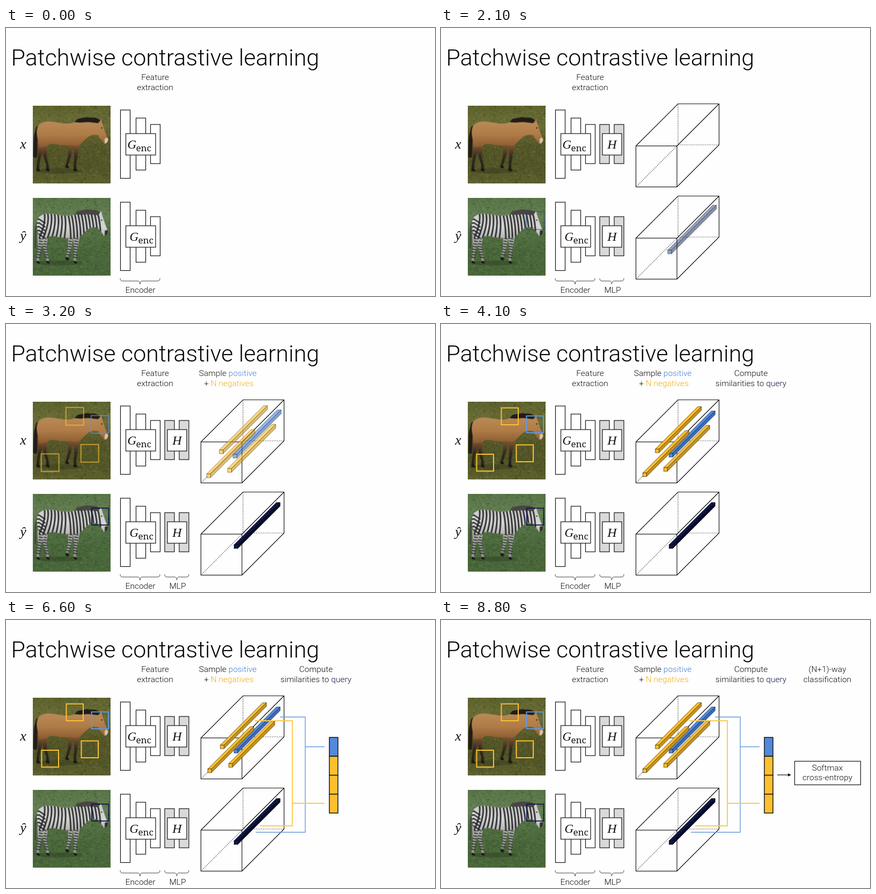
An HTML page with a canvas that plays this animation: 800 px wide and 500 px high, repeating every 8.9 s.

```html
<!DOCTYPE html>
<html lang="en">
<head>
<meta charset="utf-8">
<title>Patchwise contrastive learning</title>
<style>
html, body { margin: 0; width: 100%; height: 100%; overflow: hidden; background: #fefefe; }
canvas { display: block; width: 800px; height: 500px; }
</style>
</head>
<body>
<canvas id="stage" width="800" height="500"></canvas>
<script>
const LOOP = 8900;
const ROW = 172;
const INK = '#111', BLUE = '#5289dc', YELLOW = '#fcc02e', NAVY = '#0e1647';
const SANS = 'Roboto, "Liberation Sans", sans-serif';
const SERIF = '"Liberation Serif", "Noto Serif", serif';
let ctx = document.getElementById('stage').getContext('2d');
const stage = ctx;

// ---------- helpers ----------
const ramp = (t, from, to) => Math.min(1, Math.max(0, (t - from) / (to - from)));

function poly(points, fill, stroke, width = 1, closed = true) {
  ctx.beginPath();
  points.forEach(([x, y]) => ctx.lineTo(x, y));
  if (closed) ctx.closePath();
  if (fill) { ctx.fillStyle = fill; ctx.fill(); }
  if (stroke) { ctx.strokeStyle = stroke; ctx.lineWidth = width; ctx.stroke(); }
}

const line = (points, color, width) => poly(points, null, color, width, false);

function box(x, y, w, h, fill, stroke = '#111', width = 1.2) {
  if (fill) { ctx.fillStyle = fill; ctx.fillRect(x, y, w, h); }
  if (stroke) { ctx.strokeStyle = stroke; ctx.lineWidth = width; ctx.strokeRect(x, y, w, h); }
}

function text(str, x, y, font, color = INK, align = 'left') {
  ctx.font = font;
  ctx.fillStyle = color;
  ctx.textAlign = align;
  ctx.fillText(str, x, y);
}

const label = (str, x, y, color) => text(str, x, y, `300 15.5px ${SANS}`, color, 'center');

function twoTone(first, second, color, center, y) {
  const font = `300 15.5px ${SANS}`;
  ctx.font = font;
  const w = ctx.measureText(first).width;
  const left = center - (w + ctx.measureText(second).width) / 2;
  text(first, left, y, font);
  text(second, left + w, y, font, color);
}

function layer(alpha, draw) {
  if (alpha <= 0) return;
  ctx.save();
  ctx.globalAlpha = alpha;
  draw();
  ctx.restore();
}

function shifted(dy, draw) {
  ctx.save();
  ctx.translate(0, dy);
  draw();
  ctx.restore();
}

function zoomed(cx, cy, scale, draw) {
  ctx.save();
  ctx.translate(cx, cy);
  ctx.scale(scale, scale);
  ctx.translate(-cx, -cy);
  draw();
  ctx.restore();
}

function gradient(colors, y1, y2) {
  const g = ctx.createLinearGradient(0, y1, 0, y2);
  colors.forEach((c, i) => g.addColorStop(i / (colors.length - 1), c));
  return g;
}

// ---------- photos ----------
function random(seed) {
  return () => (seed = (seed * 16807) % 2147483647) / 2147483647;
}

function limb(points, width, color) {
  ctx.lineCap = ctx.lineJoin = 'round';
  line(points, color, width);
}

function leg(hip, knee, hoof, top, look) {
  const y = 68, mid = 94;
  poly([[hip - top, y], [hip + top, y], [knee + 3, mid], [hoof + 2.2, 112], [hoof + 3, 122 - look.lift],
    [hoof - 3, 122 - look.lift], [hoof - 2.2, 112], [knee - 3, mid]], gradient(look.leg, y, 122));
  if (look.striped) {
    for (let s = 76; s < 114; s += 5) {
      const x = s < mid ? hip + (knee - hip) * (s - y) / (mid - y) : knee + (hoof - knee) * (s - mid) / 20;
      line([[x - 3, s], [x + 3, s + 1]], '#303236', 1.8);
    }
  }
  limb([[hoof - 1, 120 - look.lift], [hoof + 2, 121 - look.lift]], 4, '#1a1812');
}

function bodyPath() {
  ctx.beginPath();
  ctx.moveTo(8, 47);
  ctx.bezierCurveTo(9, 35, 17, 30, 30, 30);
  ctx.bezierCurveTo(45, 30, 58, 36, 72, 33);
  ctx.bezierCurveTo(86, 30, 102, 28, 121, 31);
  ctx.lineTo(128, 27);
  ctx.lineTo(131, 36);
  ctx.bezierCurveTo(134, 46, 137, 54, 141, 63);
  ctx.quadraticCurveTo(140, 72, 133, 71);
  ctx.quadraticCurveTo(128, 62, 119, 56);
  ctx.bezierCurveTo(108, 51, 100, 62, 91, 71);
  ctx.bezierCurveTo(84, 79, 62, 77, 46, 73);
  ctx.quadraticCurveTo(32, 69, 28, 76);
  ctx.lineTo(12, 78);
  ctx.bezierCurveTo(12, 68, 7, 60, 8, 47);
  ctx.closePath();
}

function stripes() {
  ctx.lineCap = 'butt';
  const ink = '#28292c';
  for (let i = 0; i < 17; i++) {
    const x = 25 + i * 6.2;
    const slant = i < 7 ? -16 + i * 2 : 3;
    ctx.beginPath();
    ctx.moveTo(x - 4, 25);
    ctx.quadraticCurveTo(x + 3, 45, x + slant, 82);
    ctx.strokeStyle = ink;
    ctx.lineWidth = 2.8;
    ctx.stroke();
  }
  for (let i = 0; i < 6; i++) line([[2, 42 + i * 7], [12, 40 + i * 7], [24, 48 + i * 7]], ink, 2.3);
}

function photo(look) {
  const canvas = document.createElement('canvas');
  canvas.width = canvas.height = 145;
  ctx = canvas.getContext('2d');

  box(0, 0, 145, 145, gradient(look.grass, 0, 145), null);
  const rnd = random(look.seed);
  for (let i = 0; i < 1700; i++) {
    ctx.fillStyle = rnd() < 0.55 ? 'rgba(20,28,8,.17)' : 'rgba(190,190,120,.15)';
    ctx.fillRect(rnd() * 145, rnd() * 145, 1 + rnd() * 3, 1 + rnd());
  }
  ctx.fillStyle = 'rgba(25,30,12,.25)';
  ctx.beginPath();
  ctx.ellipse(50, 122, 44, 5, 0, 0, 7);
  ctx.fill();

  leg(72, 69, 64, 5, { ...look, lift: 6 });
  leg(22, 23, 28, 7, { ...look, lift: 0 });
  leg(82, 81, 79, 7, { ...look, lift: 0 });
  leg(18, 13, 10, 9, { ...look, lift: 0 });
  limb([[10, 42], [6, 58], [5, 94]], look.striped ? 3 : 7, look.tail);

  bodyPath();
  ctx.fillStyle = gradient(look.coat, 28, 80);
  ctx.fill();
  ctx.save();
  bodyPath();
  ctx.clip();
  if (look.striped) stripes();
  limb([[96, 72], [108, 60], [121, 58]], 6, 'rgba(45,28,14,.35)');
  limb([[46, 76], [80, 78]], 5, 'rgba(45,28,14,.3)');
  limb([[138, 64], [138, 70]], 7, look.muzzle);
  ctx.restore();
  poly([[78, 31], [84, 25], [100, 22], [118, 23], [128, 28], [122, 33], [104, 31], [88, 32]], look.mane);
  limb([[125, 32], [128, 27]], 2.6, look.coat[1]);
  ctx.fillStyle = '#17130f';
  ctx.fillRect(128, 41, 2, 2);
  ctx = stage;
  return canvas;
}

const horse = photo({
  seed: 71, grass: ['#5e642f', '#6a6c36', '#57592a', '#515426', '#5c5f2d'],
  coat: ['#b98c58', '#b07c47', '#87592f'], leg: ['#956338', '#372a1f', '#211d18'],
  tail: '#211c17', mane: '#211c18', muzzle: '#d8c6ad'
});
const zebra = photo({
  seed: 913, grass: ['#587548', '#637f53', '#4f6e41', '#48673a', '#4a683c'],
  coat: ['#c9c9c6', '#d6d6d4', '#b0afab'], leg: ['#b9b8b4', '#a6a6a1', '#8e8f89'],
  tail: '#454640', mane: '#484542', muzzle: '#35312f', striped: true
});

// ---------- diagram parts ----------
function brace(x1, x2) {
  const mid = (x1 + x2) / 2, y = 472;
  ctx.beginPath();
  ctx.moveTo(x1, y - 5);
  ctx.quadraticCurveTo(x1, y, x1 + 4, y);
  ctx.lineTo(mid - 4, y);
  ctx.quadraticCurveTo(mid, y, mid, y + 6);
  ctx.quadraticCurveTo(mid, y, mid + 4, y);
  ctx.lineTo(x2 - 4, y);
  ctx.quadraticCurveTo(x2, y, x2, y - 5);
  ctx.strokeStyle = '#444';
  ctx.lineWidth = 1;
  ctx.stroke();
}

function encoder(textX) {
  box(213.5, 153, 18, 127.5, '#fff');
  box(242.5, 168, 18, 97, '#fff');
  box(269.5, 180, 18, 73, '#fff');
  box(223.5, 197, 55.5, 40, '#fff');
  text('G', textX, 225, `italic 23px ${SERIF}`);
  text('enc', textX + 16, 229.5, '17px "Noto Serif", serif');
}

function head() {
  box(296, 180, 18, 73, '#d9d9d9');
  box(323, 180, 18, 73, '#d9d9d9');
  box(301, 197, 36, 40, '#fff');
  text('H', 319, 225, `italic 24px ${SERIF}`, INK, 'center');
}

function volume() {
  const [x, y, w, h, d] = [363.5, 220, 76.5, 76.5, 78.5];
  box(x, y, w, h, null, '#111', 1.15);
  line([[x, y], [x + d, y - d], [x + w + d, y - d], [x + w + d, y + h - d], [x + w, y + h]], '#111', 1.15);
  line([[x + w, y], [x + w + d, y - d]], '#111', 1.15);
  ctx.save();
  ctx.setLineDash([1.3, 2]);
  line([[x, y + h], [x + d, y + h - d], [x + w + d, y + h - d]], '#222', 1.2);
  line([[x + d, y - d], [x + d, y + h - d]], '#222', 1.2);
  ctx.restore();
}

function bar(x, y, front, side, edge) {
  const s = 6.8, d = 79;
  poly([[x, y], [x + d, y - d], [x + s + d, y - d], [x + s, y]], front, edge, 0.8);
  poly([[x + s, y], [x + s + d, y - d], [x + s + d, y + s - d], [x + s, y + s]], side, edge, 0.8);
  box(x, y, s, s, front, edge, 0.8);
}

function zoomBar(p, x, y, ...colors) {
  zoomed(x + 43, y - 36, 1.12 - 0.12 * p, () => bar(x, y, ...colors));
}

function patch(p, x, y, color, width = 2) {
  zoomed(x + 16, y + 16, 1.12 - 0.12 * p, () => box(x, y, 31.5, 31.5, null, color, width));
}

function query(p) {
  const mix = (a, b) => Math.round(a + (b - a) * p);
  const tone = `rgb(${mix(62, 14)},${mix(108, 22)},${mix(176, 71)})`;
  const edge = `rgb(${mix(40, 8)},${mix(60, 11)},${mix(100, 36)})`;
  zoomBar(p, 425.3, 412, tone, edge, edge);
  patch(p, 160, 343.5, tone, 1.8);
}

function sampleTitle() {
  twoTone('Sample ', 'positive', '#447fd6', 413.5, 97);
  twoTone('+ ', 'N negatives', '#efad16', 415.5, 116);
}

function samples(p) {
  const gold = [YELLOW, '#c79322', '#4d3a12'];
  zoomBar(p, 399.8, 233.3, ...gold);
  zoomBar(p, 425.3, 241.3, BLUE, '#3d6db8', '#14284a');
  zoomBar(p, 376.3, 278, ...gold);
  zoomBar(p, 415.3, 268, ...gold);
  patch(p, 112.5, 156.5, YELLOW);
  patch(p, 66.5, 243, YELLOW);
  patch(p, 140.5, 225.5, YELLOW);
  patch(p, 159.5, 171.5, '#5b98e5');
}

function similarities() {
  label('Compute', 578, 97);
  twoTone('similarities to ', 'query', NAVY, 578, 116);
}

function positiveLink() {
  const color = '#659ade';
  line([[511, 181], [558, 181], [558, 396], [466, 396]], color, 1.4);
  line([[558, 236.5], [594, 236.5]], color, 1.4);
  box(603, 219, 16, 35.3, BLUE, '#151515', 1.5);
}

function negativeLink() {
  const color = '#fccb4d';
  line([[464, 188], [534, 188], [534, 384], [474, 384]], color, 1.9);
  line([[534, 342], [594, 342]], color, 1.9);
  for (let i = 1; i < 4; i++) box(603, 219 + i * 35.3, 16, 35.3, YELLOW, '#151515', 1.5);
}

function classifier() {
  label('(N+1)-way', 720.5, 97);
  label('classification', 720.5, 116);
  line([[627, 289], [649, 289]], '#111', 1.2);
  poly([[653, 289], [647, 286], [647, 292]], '#111');
  box(659.5, 263.5, 123, 44, '#fff');
  label('Softmax', 720.5, 280.5);
  label('cross-entropy', 720.5, 299);
}

function base() {
  box(0, 0, 800, 500, '#fefefe', null);
  text('Patchwise contrastive learning', 9.5, 69.5, `300 43px ${SANS}`, '#0a0a0a');
  label('Feature', 278, 97);
  label('extraction', 278, 116);
  ctx.drawImage(horse, 49.5, 144.5);
  ctx.drawImage(zebra, 49.5, 316.5);
  text('x', 32, 225, `italic 26px ${SERIF}`, INK, 'center');
  text('ŷ', 32, 396, `italic 26px ${SERIF}`, INK, 'center');
  encoder(226.5);
  shifted(ROW, () => encoder(230.5));
  brace(213, 287);
  label('Encoder', 250.5, 494);
}

function projection() {
  head();
  shifted(ROW, head);
  volume();
  shifted(ROW, volume);
  brace(296, 341);
  label('MLP', 320, 494);
}

const steps = [
  [800, 1200, projection],
  [1900, 2300, query],
  [2800, 3220, sampleTitle],
  [2940, 3360, samples],
  [3500, 3900, similarities],
  [5100, 5500, positiveLink],
  [6000, 6400, negativeLink],
  [6950, 7350, classifier]
];

function render(now) {
  const t = now % LOOP;
  base();
  for (const [from, to, draw] of steps) {
    const p = ramp(t, from, to);
    layer(p, () => draw(p));
  }
}

const start = performance.now();
function tick() {
  render(performance.now() - start);
  requestAnimationFrame(tick);
}
tick();
</script>
</body>
</html>
```
